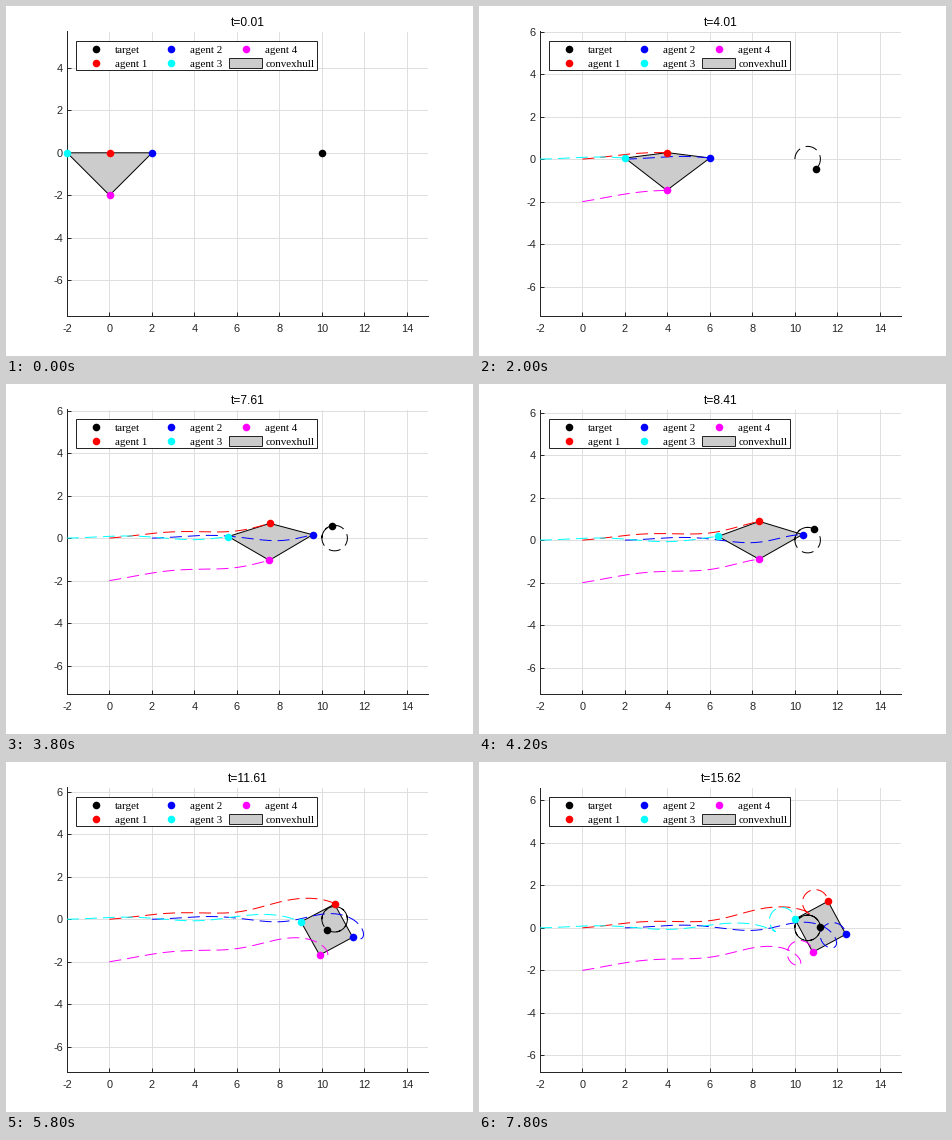
These frames come from a looping animation (467x350 px, 8 s). A matplotlib script:

```python
import numpy as np
import matplotlib.pyplot as plt
from matplotlib.animation import FuncAnimation
from matplotlib.patches import Polygon, Rectangle

W, H, DPI = 467, 350, 64
PX = 72 / DPI                      # one pixel in points
FRAMES, INTERVAL = 40, 200
T0, DT = 0.01, 0.40014             # simulated time per frame
STEP = 0.01                        # integration step
GAIN = 4

# plot area in pixels (y down) and pixels per data unit
LEFT, TOP, BOTTOM, MID, UNIT = 60.9, 25.5, 310, 168, 21.25
X0, X1 = -2, 15
INK = (0.15, 0.15, 0.15)
COLORS = ["black", "red", "blue", "cyan", "magenta"]

plt.rcParams["font.family"] = "Liberation Sans"
plt.rcParams["axes.unicode_minus"] = False


def ease(t, a, b):
    s = np.clip((t - a) / (b - a), 0, 1)
    return s * s * (3 - 2 * s)


def target(t):
    return np.array([10.6 - 0.6 * np.cos(t), 0.6 * np.sin(t)])


def target_velocity(t):
    return 0.6 * np.array([np.sin(t), np.cos(t)])


def formation(t):
    """Cross of four offsets that widens and turns on reaching the target."""
    turn = ease(t, 7, 10)
    radius = 0.6 + 0.04 * min(t, 11) + 0.21 * turn
    angle = np.radians([90, 0, 180, 270]) - 0.29 * turn
    return radius * np.column_stack([np.cos(angle), np.sin(angle)])


def simulate():
    """Agents chase their place around the target at unit speed at most."""
    pos = np.array([[0, 0], [2, 0], [-2, 0], [0, -2]], float)
    track = []
    for t in np.arange(0, T0 + DT * FRAMES, STEP):
        track.append(np.vstack([target(t), pos]))
        v = GAIN * (target(t) + formation(t) - pos) + target_velocity(t)
        speed = np.hypot(v[:, 0], v[:, 1])[:, None]
        pos = pos + STEP * v / np.maximum(speed, 1)
    return np.array(track)


TRACK = simulate()                 # time step, body, (x, y)

fig = plt.figure(figsize=(W / DPI, H / DPI), dpi=DPI, facecolor="white")
width = (X1 - X0) * UNIT
ax = fig.add_axes([LEFT / W, 1 - BOTTOM / H, width / W, (BOTTOM - TOP) / H])
ax.set_xlim(X0, X1)
ax.set_xticks(range(-2, 15, 2))
ax.set_yticks(range(-6, 7, 2))
ax.set_axisbelow(True)
ax.grid(True, color="#dfdfdf", lw=PX)
ax.tick_params(direction="in", length=3.6 * PX, width=PX, color=INK,
               labelcolor=INK, labelsize=11 * PX)
ax.tick_params(axis="x", pad=8 * PX)
ax.tick_params(axis="y", pad=4 * PX)
for side, spine in ax.spines.items():
    spine.set_visible(side in ("left", "bottom"))
    spine.set_color(INK)
    spine.set_linewidth(PX)

# overlay in pixel units for the title and the legend
hud = fig.add_axes([0, 0, 1, 1])
hud.set_xlim(0, W)
hud.set_ylim(H, 0)
hud.axis("off")
title = hud.text(242, 20, "", size=12 * PX, ha="center", va="baseline", color="black")


def box(x, y, w, h, face):
    hud.add_patch(Rectangle((x, y), w, h, fc=face, ec=INK, lw=PX))


DOT = dict(marker="o", ms=7.6 * PX, mew=0, ls="none")

box(70, 35, 241, 29, "white")
labels = ["target"] + [f"agent {i}" for i in range(1, 5)] + ["convexhull"]
for n, label in enumerate(labels):
    col, row = divmod(n, 2)
    x = 89.9 + 75 * col
    hud.text(x + 19.3, 46.6 + 14.4 * row, label, size=11 * PX,
             family="Liberation Serif", va="baseline", color="black")
    if n < len(COLORS):
        hud.plot(x, 43.2 + 13.7 * row, color=COLORS[n], **DOT)
box(223, 52, 33, 10, "#cccccc")

hull = ax.add_patch(Polygon(np.zeros((4, 2)), closed=True, fc="#cccccc",
                            ec="black", lw=PX, zorder=2))
trails = [ax.plot([], [], color=c, lw=PX, dashes=(12, 6), zorder=3)[0] for c in COLORS]
dots = [ax.plot([], [], color=c, zorder=4, clip_on=False, **DOT)[0] for c in COLORS]


def draw(k):
    t = T0 + DT * k
    past = TRACK[:round(t / STEP) + 1]
    for body, (trail, dot) in enumerate(zip(trails, dots)):
        trail.set_data(past[:, body, 0], past[:, body, 1])
        dot.set_data(past[-1:, body, 0], past[-1:, body, 1])
    _, red, blue, cyan, magenta = past[-1]
    hull.set_xy([cyan, red, blue, magenta])

    # the view stays centred on the height range covered so far
    ys = past[:, :, 1]
    mid = (ys.min() + ys.max()) / 2
    ax.set_ylim(mid - (BOTTOM - MID) / UNIT, mid + (MID - TOP) / UNIT)
    title.set_text(f"t={t:.2f}")
    return [hull, title, *trails, *dots]


anim = FuncAnimation(fig, draw, frames=FRAMES, interval=INTERVAL,
                     repeat=True, repeat_delay=0, blit=False)
plt.show()
```
